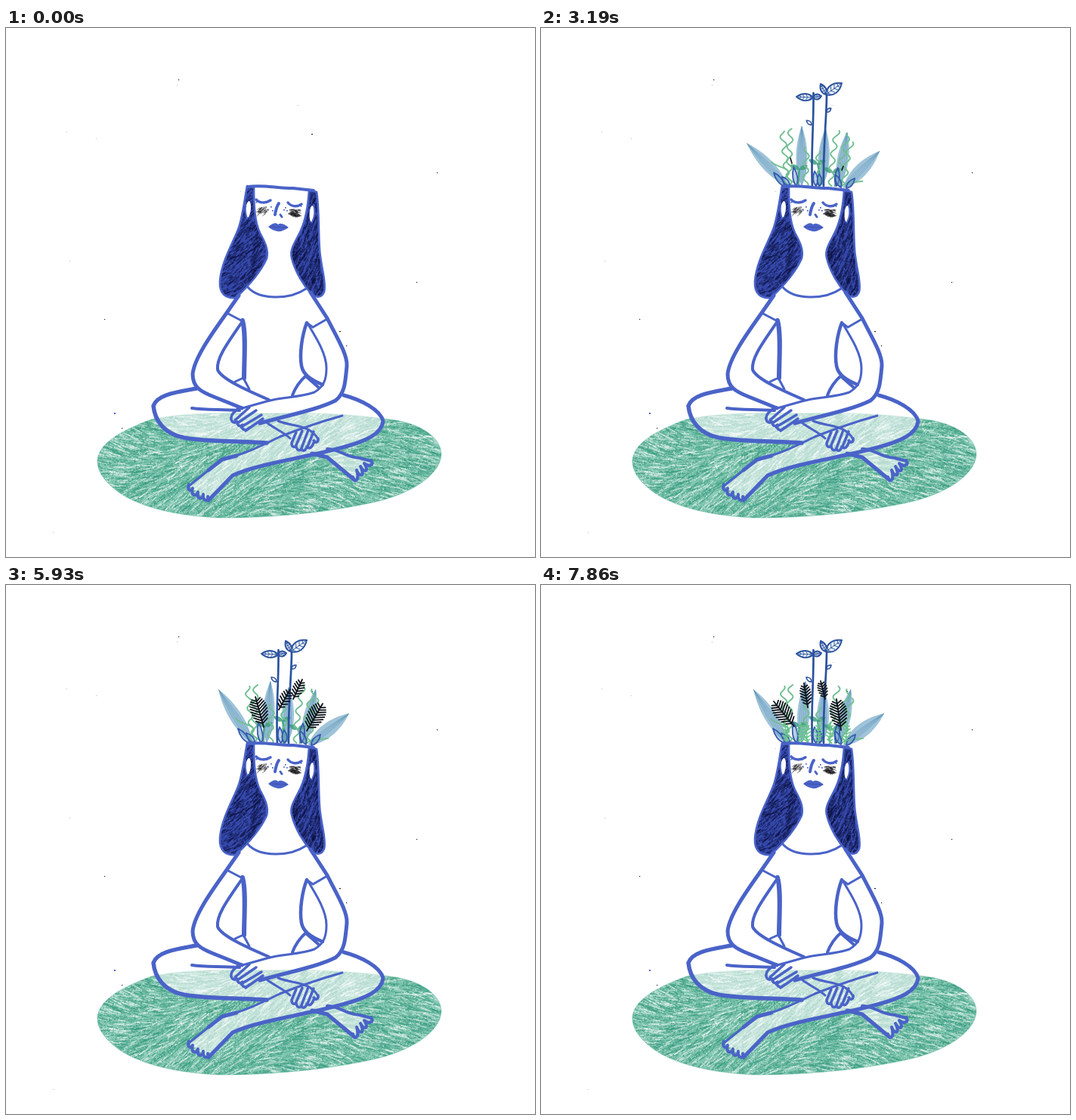
An HTML page with a canvas for the animation above (7990 ms loop, 700x700 px).

```html
<!DOCTYPE html>
<html lang="en">
<head>
<meta charset="utf-8">
<title>Garden of the mind</title>
<style>
html, body { margin: 0; width: 100%; height: 100%; overflow: hidden; background: #fff; }
canvas { display: block; width: 100vw; height: 100vh; }
</style>
</head>
<body>
<canvas id="stage" width="700" height="700"></canvas>
<script>
const LOOP = 7990, TAU = Math.PI * 2;
const BLUE = '#4a63c8', STEM = '#2b529f';
const stage = document.getElementById('stage').getContext('2d');
const still = document.createElement('canvas');
still.width = still.height = 700;
let g = still.getContext('2d');

let seed = 11;
const rnd = () => (seed = (seed * 16807) % 2147483647) / 2147483647;
const span = (a, b) => a + (b - a) * rnd();
const mix = (a, b, k) => a + (b - a) * k;

function line(d, w, color = BLUE) {
  g.strokeStyle = color;
  g.lineWidth = w;
  g.lineCap = g.lineJoin = 'round';
  g.stroke(new Path2D(d));
}
function fill(d, color) {
  g.fillStyle = color;
  g.fill(new Path2D(d));
}
// Short pencil strokes inside a box; angle may depend on the place
function hatch(n, [x0, y0, x1, y1], angle, len, w, color) {
  g.strokeStyle = color;
  g.lineWidth = w;
  for (let i = 0; i < n; i++) {
    const x = span(x0, x1), y = span(y0, y1);
    const a = angle(x, y) + span(-.25, .25), l = len * span(.3, 1) / 2;
    g.beginPath();
    g.moveTo(x - l * Math.cos(a), y - l * Math.sin(a));
    g.lineTo(x + l * Math.cos(a), y + l * Math.sin(a));
    g.stroke();
  }
}
function clipped(d, draw) {
  g.save();
  g.clip(new Path2D(d));
  draw();
  g.restore();
}

const MAT = 'M121 573C122 550 150 534 192 518C240 508 300 509 350 510C410 508 470 512 515 519C553 525 577 545 576 565C574 592 535 618 480 629C425 641 345 649 280 648C215 645 165 630 140 607C128 596 121 586 121 573Z';
const LEGS = 'M252 476C225 482 200 485 195 500C197 520 210 537 235 542C270 548 300 546 345 549C325 557 305 567 287 570L242 606L267 625L300 592C335 580 370 574 405 564L425 569L460 599L484 573C460 570 446 564 440 556C475 548 497 538 499 520C495 505 470 492 447 485Z';
const HAIR_L = 'M319 209C316 225 313 250 308 264C302 282 285 308 283 335C282 352 291 358 304 357C316 346 336 325 345 305C348 293 342 282 336 271C329 256 328 235 328 211Z';
const HAIR_R = 'M401 214L411 217C415 240 413 285 416 302C418 320 424 338 421 349C418 357 411 357 405 353C394 341 382 322 378 304C375 293 383 283 390 268C398 250 400 232 401 214Z';

const BODY = [
  [5, 'M308 354L292 377C275 401 249 436 247 458C247 475 257 481 275 488C290 494 300 498 312 503'],
  [4, 'M313 388C296 413 278 436 280 452C284 464 320 480 348 492'],
  [3, 'M292 377L313 388'],
  [6, 'M313 387C318 405 315 440 315 463'],
  [3, 'M303 468L314 463L322 478'],
  [5, 'M403 350L425 384C437 408 452 432 451 447C449 470 448 484 436 493C410 506 370 513 336 523'],
  [3, 'M425 385L406 396L398 390'],
  [4.5, 'M398 390C392 406 388 430 391 447C393 458 402 465 419 472'],
  [3, 'M399 391C412 412 424 432 424 450C424 466 420 475 408 482C390 489 365 488 345 494L313 503'],
  [4, 'M397 460C388 468 382 478 379 486M397 461L413 475'],
  [5.5, 'M252 477C225 482 200 485 195 500C197 520 210 537 235 542C270 548 300 546 345 549'],
  [4, 'M246 503C265 506 285 504 309 506'],
  [5, 'M447 486C470 492 495 505 499 520C497 538 475 547 445 555C400 568 335 576 300 592L268 625'],
  [3, 'M445 513C420 520 390 530 362 541C340 552 312 566 287 570L242 606'],
  [5, 'M305 566L286 571L268 585'],
  [4, 'M242 604C239 612 245 614 247 609C244 619 252 621 254 614C252 624 260 625 261 617C260 627 269 627 267 620'],
  [5, 'M405 563L425 568L460 597'],
  [4, 'M425 557C442 557 448 568 468 569L483 573'],
  [4, 'M483 572C489 580 478 580 474 576C482 589 472 588 469 580C476 595 467 594 464 585C469 601 459 602 459 594'],
  [3.5, 'M312 502C303 505 297 512 298 518M322 502L303 519M331 506L306 523M338 512L311 528M340 517L317 533M298 518C300 524 304 522 306 521M306 523C308 528 311 527 313 525M312 528C314 533 318 533 322 529'],
  [3, 'M345 522C355 530 368 535 376 543M360 520C380 528 402 524 413 544'],
  [3.5, 'M384 535L378 549C378 556 383 555 384 552M392 533L384 552C384 560 390 560 391 556M400 532L391 556C392 562 397 559 398 554M407 534L399 554C402 559 406 553 408 546M413 543C414 548 409 550 407 546'],
  [3, 'M320 343C335 360 375 360 397 345']
];

function paintStill() {
  g.fillStyle = '#fff';
  g.fillRect(0, 0, 700, 700);
  const box = [118, 505, 580, 650];
  const grain = (x, y) => -.2 + .55 * Math.sin(x / 70 + y / 45);
  clipped(MAT, () => {
    fill(MAT, '#83c8b1');
    hatch(2600, box, grain, 26, 1.2, 'rgba(48,150,122,.42)');
    hatch(750, box, grain, 24, 1.5, 'rgba(255,255,255,.5)');
    hatch(9000, box, () => rnd() * TAU, 2, 1, 'rgba(38,140,112,.5)');
    hatch(5000, box, () => rnd() * TAU, 2, 1, 'rgba(255,255,255,.5)');
  });
  line(MAT, 1, 'rgba(80,175,148,.5)');
  fill(LEGS, 'rgba(255,255,255,.6)');

  for (const [d, b] of [[HAIR_L, [280, 208, 350, 360]], [HAIR_R, [374, 212, 426, 360]]]) {
    clipped(d, () => {
      fill(d, '#3346a8');
      hatch(750, b, (x, y) => 1.9 - (x - 350) / 200 + y / 900, 13, 1.3, 'rgba(13,17,62,.5)');
      hatch(500, b, () => rnd() * TAU, 2, 1, 'rgba(74,99,200,.55)');
    });
    line(d, 2.6);
  }
  g.fillStyle = '#fff';
  for (const [x, y, a] of [[320.5, 240, .1], [405, 246, .05]]) {
    g.beginPath();
    g.ellipse(x, y, 3.4, 11, a, 0, TAU);
    g.fill();
  }
  line('M317 231C316 240 317 247 319 252M407 234C410 244 408 251 405 257', 2);

  for (const [w, d] of BODY) line(d, w);

  line('M361 232C358 236 357 241 356 247', 4);
  line('M363 247L365 250', 3);
  fill('M347 263C353 258 357 257 360 260C364 257 369 260 374 264C368 268 363 270 359 269C354 268 350 266 347 263Z', BLUE);
  line('M349 263L372 264', 1, '#3d52b0');
  hatch(36, [333, 237, 345, 247], () => -.5 + 1.2 * (rnd() - .5), 7, .8, 'rgba(20,20,25,.65)');
  hatch(60, [375, 240, 389, 250], () => -.3 + rnd(), 7, .9, 'rgba(20,20,25,.65)');
  g.fillStyle = BLUE;
  for (const [x, y] of [[350, 236], [352, 241], [346, 240], [369, 237], [371, 241], [367, 240]]) g.fillRect(x, y, 1.8, 1.6);

  const specks = [[228, 68], [404, 140], [570, 191], [543, 336], [450, 420], [441, 401], [130, 385], [153, 529]];
  g.fillStyle = '#222';
  specks.forEach(([x, y], i) => g.fillRect(x, y, i % 4 === 1 ? 2 : 1.2, 1.2));
  g.fillStyle = '#bbb';
  for (const [x, y] of [[226, 75], [119, 146], [80, 137], [386, 102], [84, 308], [310, 216], [62, 667]]) g.fillRect(x, y, 1, 1);
  g.fillStyle = BLUE;
  g.fillRect(143, 509, 2, 2);
}

// Stepped progress: n changes spread evenly from a to b
function steps(t, a, b, n) {
  if (t < a) return 0;
  return Math.min(n, Math.floor((t - a) / ((b - a) / (n - 1)) + 1e-6) + 1) / n;
}
// Almond from base to tip, with w as its half width
function almond(x0, y0, x1, y1, w) {
  const dx = x1 - x0, dy = y1 - y0, l = Math.hypot(dx, dy) || 1;
  const nx = -dy / l * w * 1.35, ny = dx / l * w * 1.35;
  const c = (k, s) => `${x0 + dx * k + nx * s} ${y0 + dy * k + ny * s}`;
  return `M${x0} ${y0}C${c(.25, 1)} ${c(.65, 1)} ${x1} ${y1}C${c(.65, -1)} ${c(.25, -1)} ${x0} ${y0}Z`;
}
function barbs(x0, y0, x1, y1, n, w, lw, color) {
  const dx = x1 - x0, dy = y1 - y0, l = Math.hypot(dx, dy) || 1;
  let d = `M${x0} ${y0}L${x1} ${y1}`;
  for (let i = 0; i < n; i++) {
    const k = .12 + .82 * i / n, r = w * Math.sin(Math.PI * (.25 + .65 * i / n));
    const x = x0 + dx * k, y = y0 + dy * k;
    for (const s of [-1, 1])
      d += `M${x} ${y}L${x + (dx * .65 - s * dy) / l * r} ${y + (dy * .65 + s * dx) / l * r}`;
  }
  line(d, lw, color);
}

function sprout(x, y, h, lean, p) {
  const ty = y - h * p, c = 'rgba(62,158,124,.85)';
  line(`M${x} ${y}Q${x - lean} ${y - h * p / 2} ${x + lean} ${ty}`, 2.4, c);
  fill(almond(x + lean, ty, x + lean - 12 * p, ty - 6 * p, 3 * p), c);
  fill(almond(x + lean, ty, x + lean + 11 * p, ty - 5 * p, 3 * p), c);
}
function strand(x0, x1, y1, phase, p) {
  let d = '';
  for (let i = 0; i <= 40 * p; i++) {
    const u = i / 40, a = 3.6 * Math.sin(u * 4 * TAU * (209 - y1) / 75 + phase);
    d += `${i ? 'L' : 'M'}${mix(x0, x1, u * u) + a} ${mix(209, y1, u)}`;
  }
  if (d) line(d, 1.9, '#71bf92');
}
function leaf(x0, y0, x1, y1, w, p) {
  const x = mix(x0, x1, p), y = mix(y0, y1, p), d = almond(x0, y0, x, y, w * p);
  fill(d, 'rgba(133,178,207,.78)');
  clipped(d, () => {
    for (let s = -2; s <= 2; s++)
      line(`M${x0 + s * 2} ${y0}Q${(x0 + x) / 2 + s * w * .45} ${(y0 + y) / 2} ${x} ${y}`, .8, 'rgba(82,139,178,.6)');
  });
}
function tipLeaf(x, y, dx, dy, w, p) {
  const d = almond(x, y, x + dx * p, y + dy * p, w * p);
  fill(d, '#e9f2f4');
  line(d, 1.9, STEM);
  barbs(x, y, x + dx * p, y + dy * p, 4, w * .75 * p, .9, STEM);
}
function stems(p, bud) {
  const a = mix(209, 92, p), b = mix(209, 88, p);
  line(`M359 209C357 ${mix(209, 165, p)} 361 ${mix(209, 130, p)} 360.5 ${a - 6 * p}`, 2.7, STEM);
  line(`M374 209C373 ${mix(209, 160, p)} 378 ${mix(209, 120, p)} 378 ${b}`, 2.7, STEM);
  tipLeaf(360, a, -22, -1, 4.5, p);
  tipLeaf(360, a, 11, -2, 3.5, p);
  tipLeaf(377, b, -7, -14, 3.5, p);
  tipLeaf(377, b, 21, -15, 6, p);
  if (p > .6) {
    const r = mix(.5, 1, bud);
    line(almond(358, 128, 358 - 7 * r, 128 - 6 * r, 2 * r), 1.6, STEM);
    line(almond(378, 111, 378 + 6 * r, 111 - 5 * r, 2 * r), 1.6, STEM);
  }
}

const SPROUTS = [[341, 209, 22, 1], [368, 209, 29, -2], [389, 209, 18, -3]];
// base x, tip x, first tip y, later tip x and y, phase
const STRANDS = [
  [328, 326, 148, 331, 132, 0], [325, 315, 169, 319, 134, 2], [350, 351, 164, 352, 158, 1],
  [384, 380, 160, 393, 134, 3], [395, 397, 163, 408, 138, 0], [402, 407, 164, 411, 150, 2],
  [402, 415, 199, 427, 203, 4], [370, 366, 176, 366, 162, 5], [333, 320, 180, 307, 177, 1]
];
// base, tip, swayed tip, half width
const LEAVES = [
  [326, 209, 268, 148, 281, 138, 8], [345, 209, 345, 123, 350, 127, 8], [372, 209, 377, 126, 374, 135, 8],
  [394, 209, 406, 132, 410, 138, 8], [400, 212, 452, 159, 454, 170, 9]
];
const BLADES = [[322, 209, 307, 190], [329, 209, 318, 196], [338, 209, 334, 182], [364, 209, 362, 188], [369, 209, 368, 192], [391, 209, 393, 183], [397, 211, 389, 193], [404, 212, 416, 198]];
const FERNS_R = [[341, 188, 330, 148, 9, 11], [361, 165, 376, 138, 6, 7], [380, 151, 392, 125, 6, 7], [398, 193, 419, 157, 9, 11]];
const FERNS_L = [[335, 187, 308, 154, 9, 11], [353, 162, 348, 130, 7, 7], [376, 151, 370, 127, 6, 6], [397, 192, 391, 151, 9, 11]];

// x, y and length of each drop at the middle of the shower
const DROPS = [
  [333, 52, 12], [385, 38, 11], [355, 67, 11], [412, 73, 14], [336, 112, 12], [386, 104, 15], [404, 111, 10],
  [419, 130, 15], [350, 236, 14], [383, 252, 11], [369, 266, 11], [349, 281, 11], [372, 307, 10], [354, 319, 11],
  [347, 347, 9], [381, 340, 10], [357, 365, 12], [327, 378, 9], [383, 377, 11], [325, 400, 11], [342, 403, 9],
  [363, 399, 8], [379, 409, 8], [347, 423, 7], [365, 435, 9]
];
function rain(t) {
  if (t < 6100 || t >= 7600) return;
  const q = t < 6610 ? 5930 + Math.floor((t - 5930) / 170) * 170 : 6670 + Math.floor((t - 6670) / 100) * 100;
  const shift = (q - 7070) * .47;
  g.globalAlpha = .75;
  for (const [x, y, l] of DROPS) {
    const top = y + shift;
    if (top > 12 && top + l < 619) line(`M${x} ${top + 1}L${x - .5} ${top + l}`, 2.6, '#7480cc');
  }
  g.globalAlpha = 1;
}

function eyes(open) {
  if (!open) {
    line('M331 227C335 232 344 232 350 228', 3.5);
    line('M373 231C378 237 386 237 391 233', 3.5);
    line('M333 229L331 231M389 235L391 236', 1.5);
    return;
  }
  for (const [x, y] of [[340, 227], [382, 229]]) {
    const d = `M${x - 9} ${y + 1}C${x - 5} ${y - 8} ${x + 5} ${y - 8} ${x + 9} ${y}C${x + 4} ${y + 7} ${x - 5} ${y + 7} ${x - 9} ${y + 1}Z`;
    fill(d, '#fff');
    clipped(d, () => {
      g.fillStyle = '#3a51b4';
      g.beginPath();
      g.arc(x + 1, y - 2, 4.3, 0, TAU);
      g.fill();
    });
    line(d, 2.4);
  }
}

function plants(t) {
  const young = steps(t, 30, 1050, 8), tall = steps(t, 1150, 2150, 19);
  const lush = steps(t, 2220, 3220, 14), fern = steps(t, 3350, 4060, 6);
  const grass = steps(t, 7730, 7860, 2);
  const beat = Math.floor((t - 4400) / 170);
  const rest = t >= 6600, swayed = rest || (beat > 0 && beat % 2 !== 0);
  const left = rest || (beat >= 0 && !swayed);

  if (lush) for (const [x0, y0, x1, y1, x2, y2, w] of LEAVES)
    leaf(x0, y0, swayed ? x2 : x1, swayed ? y2 : y1, w, lush);
  if (young) for (const s of SPROUTS) sprout(...s, young);
  if (tall) {
    for (const [x0, x1, y1, x2, y2, ph] of STRANDS)
      strand(x0, mix(x1, x2, lush), mix(y1, y2, lush), ph, tall);
    stems(tall, lush);
  }
  if (lush) for (const [x0, y0, x1, y1] of BLADES) {
    const d = almond(x0, y0, mix(x0, x1, lush), mix(y0, y1, lush), 3.2 * lush);
    fill(d, 'rgba(110,160,200,.5)');
    line(d, 1.8, '#3559ae');
  }
  if (fern) for (const [x0, y0, x1, y1, n, w] of left ? FERNS_L : FERNS_R)
    barbs(x0, y0, mix(x0, x1, fern), mix(y0, y1, fern), n, w * fern, 1.8, '#10151c');
  else if (lush > .8) line('M330 172L332 179M400 183L398 188', 1.6, '#10151c');
  if (grass) for (const x of [325, 345, 352, 367, 382, 403])
    barbs(x, 210, x + (x - 364) * .06, 210 - 28 * grass, 5, 5 * grass, 1.6, '#68c48b');
}

function frame(now) {
  const t = now % LOOP;
  g.drawImage(still, 0, 0);
  plants(t);
  line('M320 210C340 207 358 212 380 212L407 215', 4);
  eyes(t >= 6770 && t < 7470);
  rain(t);
  requestAnimationFrame(tick);
}
let start = null;
function tick(now) {
  if (start === null) start = now;
  frame(now - start);
}

paintStill();
g = stage;
requestAnimationFrame(tick);
</script>
</body>
</html>
```
